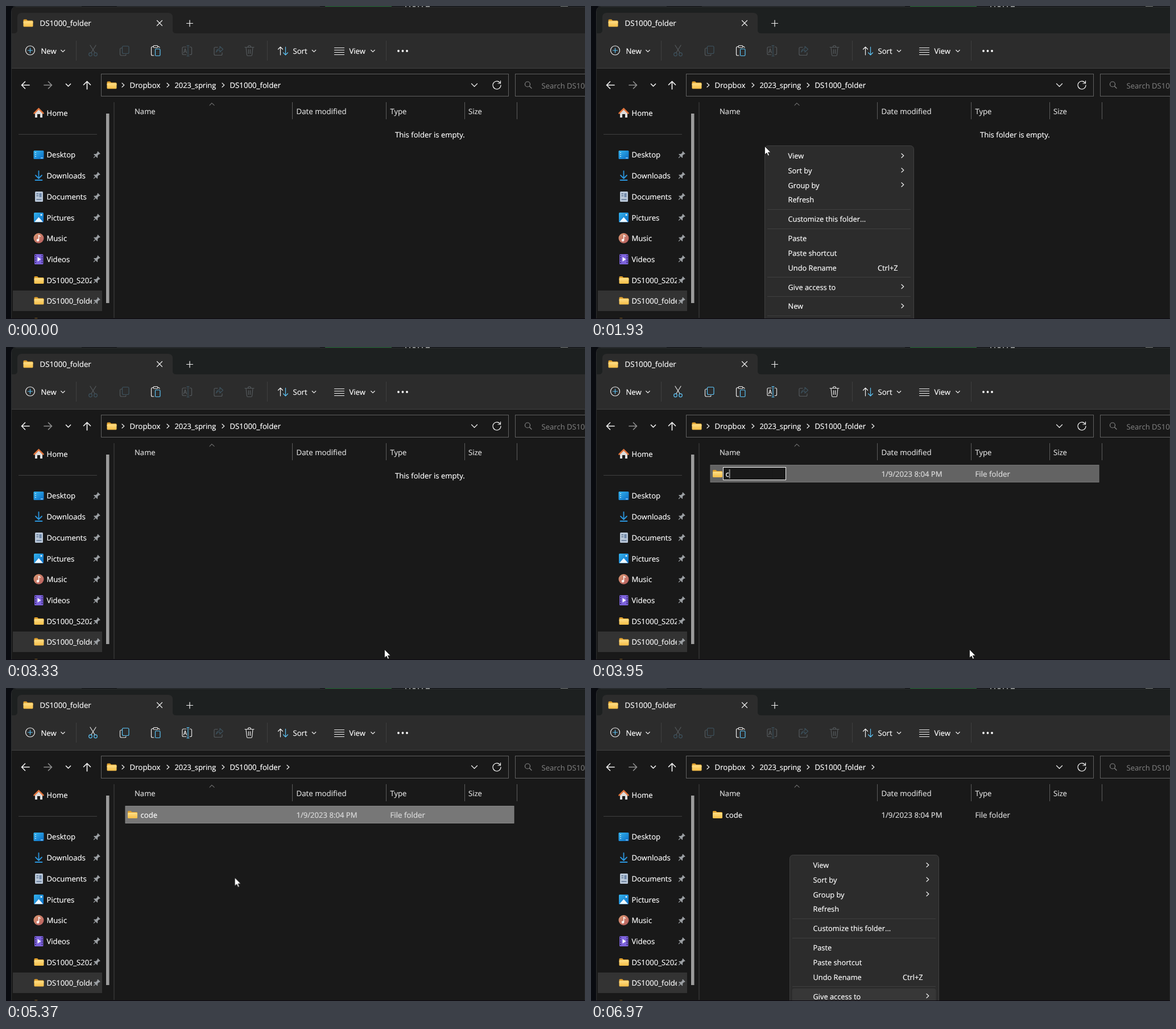
An HTML page that plays this animation: 1018x550 px, repeating every 8000 ms.

```html
<!DOCTYPE html>
<html lang="en">
<head>
<meta charset="utf-8">
<title>Creating a folder</title>
<style>
html, body { margin: 0; width: 100%; height: 100%; overflow: hidden; background: #090b10; }
svg { display: block; }
#stage { width: 1018px; height: 550px; font: 13.1px 'Open Sans', 'Noto Sans', sans-serif; fill: #fff; }
text { white-space: pre; text-rendering: geometricPrecision; stroke: #fff; stroke-width: .2px; }
.line { fill: none; stroke: #f0f0f0; stroke-width: 1.2; stroke-linecap: round; stroke-linejoin: round; }
.thin { fill: none; stroke: #3f3f3f; }
.dim { stroke: #54595c; }
.blue { stroke: #5cc3f5; }
.grey text { fill: #dedede; stroke: #dedede; }
.small { font-size: 12.8px; }

/* one 8 s loop; states hold until the next key */
.anim { animation: 8s step-end -2ms infinite; }
.title { animation-name: title; }
.lit { animation-name: lit; }
.litBlue { animation-name: litBlue; }
.empty { animation-name: empty; }
.row { animation-name: row; }
.rowFill { animation-name: rowFill; }
.rename { animation-name: rename; }
.oldName { animation-name: oldName; }
.typed { animation-name: typed; }
.crumb { animation-name: crumb; }
.menuA { animation-name: menuA; }
.menuB { animation-name: menuB; }
.hotNew { animation-name: hotNew; }
.hotGive { animation-name: hotGive; }
.sub { animation-name: sub; }
.hotFolder { animation-name: hotFolder; }
.cursor { animation-name: cursor; }
.click { animation-name: click; }

@keyframes title { 0% { fill: #202020 } 16.375%, to { fill: #1d2020 } }
@keyframes lit { 0% { stroke: #54595c } 43.125% { stroke: #e4e4e4 } 74.625%, to { stroke: #54595c } }
@keyframes litBlue { 0% { stroke: #3d525e } 43.125% { stroke: #5cc3f5 } 74.625%, to { stroke: #3d525e } }
@keyframes empty { 0% { opacity: 1 } 43.125%, to { opacity: 0 } }
@keyframes row { 0% { opacity: 0 } 43.125%, to { opacity: 1 } }
@keyframes rowFill {
  0% { fill: #636363; stroke: #747474 }
  56.875% { fill: #777; stroke: #858585 }
  72.125%, to { fill: transparent; stroke: transparent }
}
@keyframes rename { 0% { opacity: 0 } 43.125% { opacity: 1 } 55.625%, to { opacity: 0 } }
@keyframes oldName { 0% { opacity: 1 } 49.375%, to { opacity: 0 } }
@keyframes typed {
  0% { transform: translateX(0) }
  49.375% { transform: translateX(6.6px) }
  50.625% { transform: translateX(14.4px) }
  51.875% { transform: translateX(22.4px) }
  53.125%, to { transform: translateX(29.8px) }
}
@keyframes crumb { 0% { opacity: 0 } 44.375%, to { opacity: 1 } }
@keyframes menuA { 0% { opacity: 0 } 22.625% { opacity: .75 } 24.125% { opacity: 1 } 41.625%, to { opacity: 0 } }
@keyframes menuB { 0% { opacity: 0 } 78.375% { opacity: .75 } 79.625%, to { opacity: 1 } }
@keyframes hotNew { 0% { opacity: 0 } 34.125%, to { opacity: 1 } }
@keyframes hotGive { 0% { opacity: 0 } 84.625%, to { opacity: 1 } }
@keyframes sub { 0% { opacity: 0 } 36.625% { opacity: 1 } 41.625%, to { opacity: 0 } }
@keyframes hotFolder { 0% { opacity: 0 } 37.875%, to { opacity: 1 } }
@keyframes cursor {
  0% { transform: translate(1100px, 600px) }
  3.875% { transform: translate(838px, 494px); animation-timing-function: steps(4, start) }
  8.875% { transform: translate(518px, 346px); animation-timing-function: steps(5, start) }
  15.125% { transform: translate(328px, 259px); animation-timing-function: steps(3, start) }
  18.875% { transform: translate(305px, 246px) }
  26.625% { transform: translate(305px, 246px); animation-timing-function: steps(5, start) }
  32.875% { transform: translate(540px, 527px) }
  34.125% { transform: translate(540px, 527px); animation-timing-function: steps(5, start) }
  40.375% { transform: translate(665px, 531px) }
  61.875% { transform: translate(665px, 531px); animation-timing-function: steps(6, start) }
  69.375% { transform: translate(349px, 293px) }
  80.875% { transform: translate(349px, 293px); animation-timing-function: steps(4, start) }
  85.875% { transform: translate(550px, 533px) }
  87.125%, to { transform: translate(584px, 575px) }
}
@keyframes click {
  0% { transform: scale(0) }
  20.125% { transform: scale(.7) }
  22.625% { transform: scale(0) }
  39.125% { transform: scale(1) }
  41.625% { transform: scale(0) }
  69.625% { transform: scale(1) }
  72.125% { transform: scale(0) }
  75.875% { transform: scale(.7) }
  78.375%, to { transform: scale(0) }
}
</style>
</head>
<body>
<svg id="stage" viewBox="0 0 1018 550">
  <defs>
    <linearGradient id="gold" x2="0" y2="1"><stop stop-color="#ffdf88"/><stop offset="1" stop-color="#f6bd45"/></linearGradient>
    <linearGradient id="sky" x2="1" y2="1"><stop stop-color="#35b4ee"/><stop offset="1" stop-color="#0a6cc4"/></linearGradient>
    <linearGradient id="rose" x2="1" y2="1"><stop stop-color="#dd9a72"/><stop offset="1" stop-color="#b45a5e"/></linearGradient>
    <clipPath id="side"><rect y="460" width="151" height="88"/></clipPath>

    <g id="folder">
      <path d="M-8.500-5Q-8.500-6.500-7-6.500H-3L-1-4.500H7Q8.500-4.500 8.500-3V0H-8.500Z" fill="#e0a02c"/>
      <rect x="-8.500" y="-3.500" width="17" height="10" rx="1.500" fill="url(#gold)"/>
    </g>
    <path id="right" class="line" d="M-2-3.500 1.800 0-2 3.500"/>
    <path id="down" class="line" d="M-3.200-1.500 0 1.600 3.200-1.500"/>
    <path id="arrow" class="line" style="stroke:inherit;stroke-width:1.700" d="M7 0H-6.500M-.5-6-6.500 0-.5 6"/>
    <g id="pin" transform="rotate(45)" fill="#9b9fa3">
      <path d="M-3-6.500H3V-5L2-4.500V-1L4.500 1.500V2.500H-4.500V1.500L-2-1V-4.500L-3-5Z"/>
      <path d="M-.6 2.500H.6V7H-.6Z"/>
    </g>

    <g id="menu" class="small">
      <path class="thin" d="M5 112.500H257M5 146.500H257M5 231.500H257M5 265.500H257M5 299.500H257"/>
      <text x="41.500" y="23">View</text>
      <text x="41.500" y="49">Sort by</text>
      <text x="41.500" y="74.500">Group by</text>
      <text x="41.500" y="100">Refresh</text>
      <text x="41.500" y="134">Customize this folder...</text>
      <text x="41.500" y="168">Paste</text>
      <text x="41.500" y="193.500">Paste shortcut</text>
      <text x="41.500" y="219.500">Undo Rename</text>
      <text x="199" y="219.500">Ctrl+Z</text>
      <text x="41.500" y="253.500">Give access to</text>
      <text x="41.500" y="287">New</text>
      <use href="#right" x="243" y="18"/>
      <use href="#right" x="243" y="43.500"/>
      <use href="#right" x="243" y="69"/>
      <use href="#right" x="243" y="248"/>
      <use href="#right" x="243" y="282"/>
    </g>
    <rect id="panel" x=".5" y=".5" width="262" height="400" rx="6" fill="#2c2c2c" stroke="#404040"/>
    <rect id="hot" x="4.500" width="253" height="27" rx="4" fill="#373737"/>
  </defs>

  <!-- backdrop and window frame -->
  <rect width="1018" height="550" fill="#090b10"/>
  <path d="M12 .5H133M195 .5H552" stroke="#23272b"/>
  <path d="M561 .5H678" stroke="#1f6b34" stroke-width="3"/>
  <path d="M9.500 550V10Q9.500 1.500 18 1.500H1018V550Z" fill="#191919" stroke="#2e3030"/>
  <path class="anim title" d="M10 48V10Q10 2 18 2H1018V48Z" fill="#202020"/>
  <path d="M702 1H704M709 1H711M715 1H720M724 1H726M731 1H733M738 1H745" stroke="#858888" stroke-width="2"/>
  <path d="M975 .5H988" stroke="#6c7070"/>

  <!-- tab -->
  <path d="M10 110V48H14Q20 48 20 42V20Q20 12 28 12H285Q293 12 293 20V42Q293 48 299 48H1018V110Z" fill="#2c2c2c"/>
  <path class="thin" d="M10 109.500H1018"/>
  <use href="#folder" x="39" y="30"/>
  <text x="59.500" y="35" font-size="13.300">DS1000_folder</text>
  <path class="line" d="M265.500 25.500 274.500 34.500M274.500 25.500 265.500 34.500M317.500 30.500H328.500M323 25V36"/>

  <!-- toolbar -->
  <path class="thin" d="M123.500 61V96M459.500 61V96M668.500 61V96"/>
  <circle class="line" cx="42.500" cy="78" r="8"/>
  <path class="line blue" d="M38.500 78H46.500M42.500 74V82"/>
  <text x="61.500" y="84">New</text>
  <use href="#down" x="100" y="79"/>
  <g class="line">
    <path class="anim lit" d="M148 69 156.500 82.500M158 69 149.500 82.500"/>
    <g class="anim litBlue"><circle cx="148.500" cy="85" r="2.800"/><circle cx="157.500" cy="85" r="2.800"/></g>
    <path class="anim lit" d="M204 74H202Q200.500 74 200.500 76V84.500Q200.500 87 203 87H209Q211 87 211 85"/>
    <rect class="anim litBlue" x="204.500" y="70.500" width="11.500" height="13" rx="2"/>
    <path d="M259 71.500H257.500Q255.500 71.500 255.500 73.500V85Q255.500 87 257.500 87H260M267 71.500H268.500Q270 71.500 270 73"/>
    <rect x="259" y="69.500" width="8" height="3.500" rx="1.500"/>
    <rect class="blue" x="262.500" y="75.500" width="8.500" height="12" rx="1.500"/>
    <path class="anim lit" d="M317 72H312Q310 72 310 74V83.500Q310 85.500 312 85.500H317M323 72H324.500Q326.500 72 326.500 74V83.500Q326.500 85.500 324.500 85.500H323M312.500 82.500 315 75 317.500 82.500M313.500 80H316.500"/>
    <path class="anim litBlue" d="M320 70V88M318 69.500H322M318 88H322"/>
    <path class="dim" d="M372 72.500H368Q366 72.500 366 74.500V84.500Q366 86.500 368 86.500H378Q380 86.500 380 84.500V82"/>
    <path style="stroke:#3d525e" d="M369.500 81Q371 75 376 75V71L381.500 76 376 81V77.500Q372 77.500 369.500 81Z"/>
    <path class="anim lit" d="M420 72.500H436M422 72.500 423.500 86Q423.700 87.500 425 87.500H431Q432.300 87.500 432.500 86L434 72.500M425.500 72Q425.500 69.500 428 69.500T430.500 72M426.500 76.500V83.500M429.500 76.500V83.500"/>
    <path d="M482.500 86V72M478.500 76 482.500 72 486.500 76"/>
    <path class="blue" d="M491.500 72V86M487.500 82 491.500 86 495.500 82"/>
    <path d="M577.500 73.500H594.500M577.500 77.500H594.500M577.500 81.500H594.500M577.500 85.500H594.500"/>
  </g>
  <text x="504.500" y="84">Sort</text>
  <use href="#down" x="541.500" y="79"/>
  <text x="603.500" y="84">View</text>
  <use href="#down" x="645" y="79"/>
  <circle cx="690" cy="79" r="1.900"/><circle cx="697.500" cy="79" r="1.900"/><circle cx="705" cy="79" r="1.900"/>

  <!-- address bar -->
  <g stroke="#f0f0f0">
    <use href="#arrow" x="34" y="139"/>
    <use href="#arrow" transform="translate(74 139) scale(-1)" stroke="#8d8d8d"/>
    <use href="#arrow" transform="translate(142.500 139) rotate(90)"/>
  </g>
  <path class="line" style="stroke-width:1.700" d="M105.500 137 109.500 141 113.500 137"/>
  <g fill="#191919" stroke="#606060">
    <rect x="167.500" y="119.500" width="716" height="39"/>
    <rect x="895.500" y="119.500" width="140" height="39"/>
  </g>
  <use href="#folder" x="186" y="139"/>
  <use href="#right" x="206" y="139"/>
  <text x="217.500" y="144" font-size="13.300">Dropbox</text>
  <use href="#right" x="285" y="139"/>
  <text x="296.500" y="144" font-size="12.900">2023_spring</text>
  <use href="#right" x="382" y="139"/>
  <text x="393.500" y="144" font-size="13.200">DS1000_folder</text>
  <g class="anim crumb" opacity="0"><use href="#right" x="496" y="139"/></g>
  <path class="line" d="M818.500 136.500 823.500 141.500 828.500 136.500"/>
  <path class="line" d="M869 135.500A7 7 0 1 0 870 139M869.500 131.500V136H865"/>
  <g class="line" style="stroke:#858585"><circle cx="917" cy="137.500" r="4.500"/><path d="M920.500 141 924 144.500"/></g>
  <text x="941.500" y="144.500" style="fill:#858585;stroke:none">Search DS1000_folder</text>

  <!-- sidebar -->
  <rect x="12" y="500" width="157" height="36" fill="#333"/>
  <path d="M22 225.500H160" class="thin"/>
  <rect x="176" y="189" width="5.500" height="333" fill="#9c9c9c"/>
  <path d="M190 169V548" stroke="#2e2e2e" stroke-width="2"/>

  <path d="M51 187 57.500 181 64 187V196H60V190H55V196H51Z" fill="#dcdcdc"/>
  <path d="M49.500 188.500 57.500 180.500 65.500 188.500" fill="none" stroke="#e0743c" stroke-width="2.500" stroke-linecap="round"/>
  <text x="71.500" y="193">Home</text>

  <rect x="48.500" y="254" width="18" height="15" rx="1.500" fill="url(#sky)"/>
  <path d="M51 257.500H53M51 261H53M51 264.500H53M61 267H65" stroke="#d9f1ff" stroke-width="1.200"/>
  <text x="71.500" y="266">Desktop</text>

  <path class="line" style="stroke:#2b95dc;stroke-width:1.800" d="M57.500 290V302.500M52 297.500 57.500 303 63 297.500M51.500 306H63.500"/>
  <text x="71.500" y="303">Downloads</text>

  <rect x="51" y="326" width="14" height="18" rx="1.500" fill="#b9c7d8"/>
  <path d="M53.500 330H57M53.500 333.500H57M53.500 340H62.500" stroke="#5b7390" stroke-width="1.500"/>
  <rect x="58.500" y="329" width="4" height="7" fill="#6e87a8"/>
  <text x="71.500" y="340">Documents</text>

  <rect x="49" y="363" width="17" height="17" rx="1.500" fill="url(#sky)"/>
  <path d="M50 379.500 57.500 371 65 379.500Z" fill="#f3faff"/><circle cx="62" cy="367" r="1.500" fill="#f3faff"/>
  <text x="71.500" y="376.500">Pictures</text>

  <circle cx="57.500" cy="408" r="9" fill="url(#rose)"/>
  <circle cx="56" cy="411.500" r="2.200"/><path d="M57.600 411.500V403L61 405" fill="none" stroke="#fff" stroke-width="1.400"/>
  <text x="71.500" y="413">Music</text>

  <rect x="50" y="436" width="15.500" height="18" rx="1.500" fill="#7d63dc"/>
  <path d="M52 437.500V453M63.500 437.500V453" stroke="#35246f" stroke-width="2" stroke-dasharray="2"/>
  <path d="M55.500 441 61.500 445 55.500 449Z"/>
  <text x="71.500" y="450">Videos</text>

  <use href="#folder" x="58" y="481.500"/>
  <use href="#folder" x="58" y="518"/>
  <use href="#folder" x="58" y="555"/>
  <g clip-path="url(#side)">
    <text x="71.500" y="486.500">DS1000_S2023</text>
    <text x="71.500" y="523">DS1000_folder</text>
  </g>
  <use href="#pin" x="159" y="262"/>
  <use href="#pin" x="159" y="298.500"/>
  <use href="#pin" x="159" y="335.500"/>
  <use href="#pin" x="159" y="372"/>
  <use href="#pin" x="159" y="408.500"/>
  <use href="#pin" x="159" y="445"/>
  <use href="#pin" x="159" y="482"/>
  <use href="#pin" x="159" y="518.500"/>

  <!-- file list -->
  <path d="M503.500 169V199M668.500 169V199M806.500 169V199M898.500 169V199" stroke="#5c5c5c"/>
  <path class="line" style="stroke:#a0a0a0;stroke-width:1" d="M358 174.500 362 170.500 366 174.500"/>
  <g class="grey">
    <text x="226" y="189.500">Name</text>
    <text x="510.500" y="189.500" font-size="13.300">Date modified</text>
    <text x="675.500" y="189.500">Type</text>
    <text x="813" y="189.500">Size</text>
  </g>
  <text class="anim empty" x="684" y="231">This folder is empty.</text>
  <g class="anim row" opacity="0">
    <rect class="anim rowFill" x="210" y="207.500" width="683" height="30" fill="#636363"/>
    <use href="#folder" x="222.500" y="222.500"/>
    <text x="236.500" y="228">code</text>
    <g class="grey">
      <text x="510.500" y="228">1/9/2023 8:04 PM</text>
      <text x="675.500" y="228" font-size="13.300">File folder</text>
    </g>
    <g class="anim rename">
      <rect x="232.500" y="211.500" width="110" height="22" fill="#191919" stroke="#f4f4f4"/>
      <text x="236.500" y="228">code</text>
      <g class="anim typed">
        <rect x="236.500" y="213" width="76" height="19" fill="#191919"/>
        <path d="M237 215V231" stroke="#f4f4f4"/>
      </g>
      <g class="anim oldName">
        <rect x="236" y="214" width="68" height="17" fill="#0078d7"/>
        <text x="236.500" y="228">New folder</text>
      </g>
    </g>
  </g>

  <!-- menus -->
  <g transform="translate(305 245)">
    <g class="anim menuA" opacity="0">
      <use href="#panel"/>
      <g class="anim hotNew" opacity="0"><use href="#hot" y="269"/></g>
      <use href="#menu"/>
    </g>
  </g>
  <g transform="translate(349 293)">
    <g class="anim menuB" opacity="0">
      <use href="#panel"/>
      <g class="anim hotGive" opacity="0"><use href="#hot" y="235"/></g>
      <use href="#menu"/>
    </g>
  </g>
  <g class="anim sub" opacity="0">
    <rect x="563.500" y="512.500" width="297" height="80" rx="6" fill="#2c2c2c" stroke="#404040"/>
    <rect class="anim hotFolder" x="568" y="516" width="288" height="28" rx="4" fill="#373737"/>
    <use href="#folder" x="583" y="530.500"/>
    <text class="small" x="603.500" y="535">Folder</text>
    <rect x="575" y="547" width="17" height="4"/>
  </g>

  <rect y="549" width="1018" height="1" fill="#0d0912"/>

  <!-- pointer -->
  <g class="anim cursor" transform="translate(1100 600)">
    <circle class="anim click" r="14" fill="#fff000" fill-opacity=".53"/>
    <path d="M.5 .5V15.200L3.900 12 6.300 17.200 8.600 16.200 6.300 11.200H11Z" fill="#fff" stroke="#111" stroke-width=".8"/>
  </g>
</svg>
</body>
</html>
```
